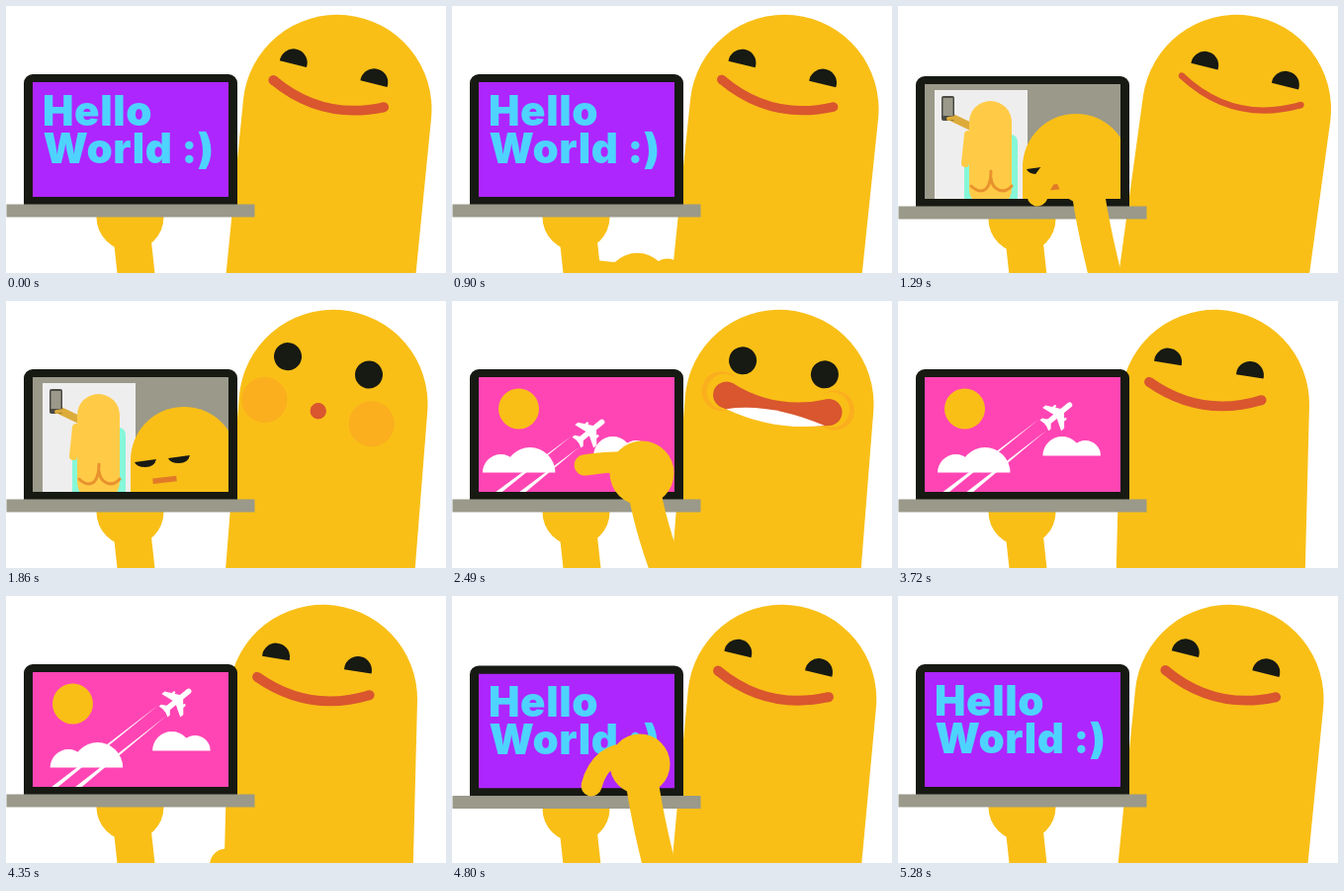
An HTML page with a canvas for the animation above (6630 ms loop, 445 px wide and 270 px high).

```html
<!DOCTYPE html>
<html lang="en">
<head>
<meta charset="utf-8">
<title>Hello World</title>
<style>
  html, body { margin: 0; width: 100%; height: 100%; overflow: hidden; background: #fff; }
  canvas { display: block; width: 445px; height: 270px; }
</style>
</head>
<body>
<canvas id="stage" width="445" height="270"></canvas>
<script>
const ctx = document.getElementById('stage').getContext('2d');
const LOOP = 6630, STEP = 30, TAU = Math.PI * 2;
const YELLOW = '#f9bf17', BLACK = '#171913', GREY = '#9a998a', RED = '#d9562f', BLUSH = '#fbae1e';

const clamp = v => Math.max(0, Math.min(1, v));
const smooth = v => v * v * (3 - 2 * v);
const hump = v => Math.sin(Math.PI * clamp(v));

// keys: [time, pose]; poses are eased into each other
function poseAt(keys, time) {
  const next = keys.findIndex(([t]) => time <= t);
  if (next <= 0) return keys.at(next)[1];
  const [from, a] = keys[next - 1], [to, b] = keys[next];
  const p = smooth((time - from) / (to - from));
  return Object.fromEntries(Object.keys(a).map(k => [k, a[k] + (b[k] - a[k]) * p]));
}

function disc(x, y, r, color) {
  ctx.fillStyle = color;
  ctx.beginPath();
  ctx.arc(x, y, Math.max(0, r), 0, TAU);
  ctx.fill();
}
function box(x, y, w, h, color, radius = 0) {
  ctx.fillStyle = color;
  ctx.beginPath();
  ctx.roundRect(x, y, w, h, radius);
  ctx.fill();
}
function shape(d, color) {
  ctx.fillStyle = color;
  ctx.fill(new Path2D(d));
}
function line(d, color, width, cap = 'round') {
  ctx.strokeStyle = color;
  ctx.lineWidth = width;
  ctx.lineCap = cap;
  ctx.lineJoin = 'round';
  ctx.stroke(new Path2D(d));
}

// x, y place the point between the eyes relative to the head
const smile = {
  head: 335, x: -3.5, y: -37, tilt: .24, open: .1,
  half: 57.5, lipY: 22, bend: 50, lip: 5, blush: 0, hollow: 0, teeth: 0
};
const lean = { ...smile, head: 342.5, x: 8.5, y: -34.5, half: 62, lipY: 16, bend: 51, lip: 3.2 };
const surprise = {
  ...smile, head: 331, x: -5, y: -39, tilt: .22, open: Math.PI / 2,
  half: 0, lipY: 47, bend: 47, lip: 8, blush: 1
};
const grin = {
  ...surprise, x: 4.5, y: -37, tilt: .168,
  half: 52.5, lipY: 37, bend: 53.5, lip: 13.5, hollow: 1, teeth: 1
};
const calm = { ...smile, head: 320.5, x: -6, y: -36, tilt: .16, lipY: 23, bend: 51, hollow: 1 };
const MOODS = [
  [780, smile], [1290, lean], [1470, lean], [1800, surprise], [1890, surprise],
  [2160, grin], [3210, grin], [3690, calm], [4380, calm], [4890, smile]
];

// curl 0 points the finger straight at the screen, 1 hooks it down
const away = { x: 212, y: 345, curl: 0 };
const windUp = { x: 142, y: 165, curl: -.8 };
const tap = { x: 190, y: 170, curl: 1 };
const rest = { x: 192, y: 174, curl: 0 };
const lift = { x: 172, y: 154, curl: -.3 };
const GESTURE = [
  [0, away], [300, windUp], [450, tap], [510, tap],
  [570, rest], [690, rest], [780, lift], [960, away]
];
const TAPS = [780, 1920, 4320], HIT = 450;

function drawMouth({ half, lipY, bend, lip, teeth }) {
  const angle = Math.atan2(bend - lipY, half);
  const nx = Math.sin(angle) * lip, ny = Math.cos(angle) * lip;
  const depth = lip * (1.05 - .35 * teeth);
  disc(-half, lipY, lip, RED);
  disc(half, lipY, lip, RED);
  shape(`M${nx - half},${lipY - ny} Q0,${bend - depth} ${half - nx},${lipY - ny}
    L${half + nx},${lipY + ny} Q0,${bend + depth} ${-half - nx},${lipY + ny}Z`, RED);
  if (teeth <= 0) return;
  const t = 50.5 * teeth;
  shape(`M${-t},51 Q-8,${51 - 14 * teeth} ${t},51 Q0,${51 + 14 * teeth} ${-t},51Z`, '#fff');
}

function drawCharacter(time) {
  const pose = poseAt(MOODS, time);
  const { head, x, y, tilt, open, blush, hollow } = pose;
  const foot = 318 + (head - 331) * .16;
  ctx.save();
  ctx.translate(head, 104.3 - 4 * hump((time - 1530) / 300));
  line(`M0,0 L${(foot - head) * 1.4},232`, YELLOW, 191);
  ctx.translate(x, y);
  ctx.rotate(tilt);
  for (const side of [-1, 1]) {
    const cheekX = side * (55.5 + 2.5 * hollow), cheekY = 48 - 14 * hollow;
    disc(cheekX, cheekY, blush * (23 - 3 * hollow), BLUSH);
    disc(cheekX - side * 3 * hollow, cheekY, blush * hollow * 18, YELLOW);
    ctx.fillStyle = BLACK;
    ctx.beginPath();
    ctx.arc(side * 42, 0, 14, Math.PI - open, TAU + open);
    ctx.fill();
  }
  drawMouth(pose);
  ctx.restore();
}

function drawHello() {
  box(27, 77, 198, 116, '#ae26fe');
  ctx.fillStyle = '#4ed3ff';
  ctx.font = '900 42px Inter, sans-serif';
  ctx.letterSpacing = '0.6px';
  ctx.fillText('Hello', 37, 121);
  ctx.fillText('World :)', 37.5, 158.5);
}

function drawSelfie() {
  const skin = '#ffcb47', arm = '#dcab3a';
  box(27, 77, 198, 116, GREY);
  box(37, 83, 94, 110, '#efeeee');
  box(67, 128, 54, 70, '#86f7d8', 7);
  line('M74,120 L53,110', arm, 8);
  box(44, 89, 13, 25, '#4b4a45', 2);
  box(45.5, 91, 10, 18, GREY);
  line('M51,112 L58,111', arm, 4);
  line('M71,128 L68,157', skin, 8);
  box(72, 94, 43, 110, skin, 21.5);
  line('M74,180 Q82,188 89,183 Q94,178 94,165 M94,172 Q95,180 100,183 Q108,188 115,180', '#e8922d', 3);
  disc(180, 161, 54, YELLOW);
  box(126, 161, 108, 40, YELLOW);
  for (const [x, y] of [[141, 161], [175, 157]]) {
    shape(`M${x - 11},${y + 2} L${x + 11},${y - 1} Q${x + 9},${y + 7} ${x},${y + 7}
      Q${x - 9},${y + 7} ${x - 11},${y + 2}Z`, BLACK);
  }
  line('M148.5,182.3 L172.5,179.5', '#e07a28', 5.5, 'butt');
}

function cloud(x, y, size) {
  ctx.fillStyle = '#fff';
  ctx.beginPath();
  for (const [dx, r] of size) ctx.arc(x + dx, y, r, Math.PI, TAU);
  ctx.fill();
}

function drawFlight(time) {
  const s = (time - 3180) / 1000;
  const px = 153 + 17.8 * s, py = 121.5 - 14 * s;
  box(27, 77, 198, 116, '#ff45b4');
  disc(67.5, 109, 20.5, YELLOW);
  for (const [foot, dx, dy] of [[45, -20, 5.5], [69, -12, 16.5]]) {
    shape(`M${foot + s},193 L${px + dx},${py + dy} L${foot + 6.5 + s},193Z`, '#fff');
  }
  cloud(36 + 7.4 * s, 173.5, [[18.5, 18.5], [48, 25.5]]);
  cloud(145 + 2.7 * s, 156.5, [[19.5, 19.5], [43, 15.5]]);
  ctx.save();
  ctx.translate(px, py);
  ctx.rotate(-.68);
  line('M-15,0 H14', '#fff', 5.5);
  for (const side of [1, -1]) {
    ctx.scale(1, side);
    shape('M6,1 L-5,15 L-9,15 L-4,1Z M-11,1 L-16,7 L-19,7 L-17,0Z', '#fff');
    box(-2, 7, 5, 2.5, '#fff', 1);
  }
  ctx.restore();
}

const VIEWS = [drawHello, drawSelfie, drawFlight, drawHello];

function drawLaptop(time) {
  const hits = TAPS.map(start => start + HIT).filter(hit => time >= hit);
  ctx.save();
  if (hits.length) ctx.translate(0, 2 * hump((time - hits.at(-1)) / 120));
  disc(125.5, 213.5, 34, YELLOW);
  shape('M109,238 L113,275 H151 L147,238Z', YELLOW);
  box(18, 69, 216, 132, BLACK, [9, 9, 0, 0]);
  ctx.save();
  ctx.beginPath();
  ctx.rect(27, 77, 198, 116);
  ctx.clip();
  VIEWS[hits.length](time);
  ctx.restore();
  box(0.5, 200.5, 251, 13, GREY);
  ctx.restore();
}

function drawHand(time) {
  const start = TAPS.find(t => time > t && time < t + 960);
  if (start === undefined) return;
  const { x, y, curl } = poseAt(GESTURE, time - start);
  const elbow = 217 + (x - 192) * .3 - 7 * curl;
  ctx.save();
  line(`M${x},${y} Q${x + 4},${y + 40} ${elbow},272 L${elbow + 8},310`, YELLOW, 33, 'butt');
  ctx.translate(x, y);
  line(`M-8,-11 Q${-32 - 8 * curl},-12 ${-58 + 9 * curl},${-8 + 30 * curl}`, YELLOW, 21);
  disc(0, 0, 32.5 - 2 * Math.abs(curl), YELLOW);
  ctx.restore();
}

function frame(now) {
  const time = Math.floor(now % LOOP / STEP) * STEP;
  ctx.fillStyle = '#fff';
  ctx.fillRect(0, 0, 445, 270);
  drawCharacter(time);
  drawLaptop(time);
  drawHand(time);
}

let begin;
function tick(now) {
  begin ??= now;
  frame(now - begin);
  requestAnimationFrame(tick);
}
frame(0);
requestAnimationFrame(tick);
</script>
</body>
</html>
```
